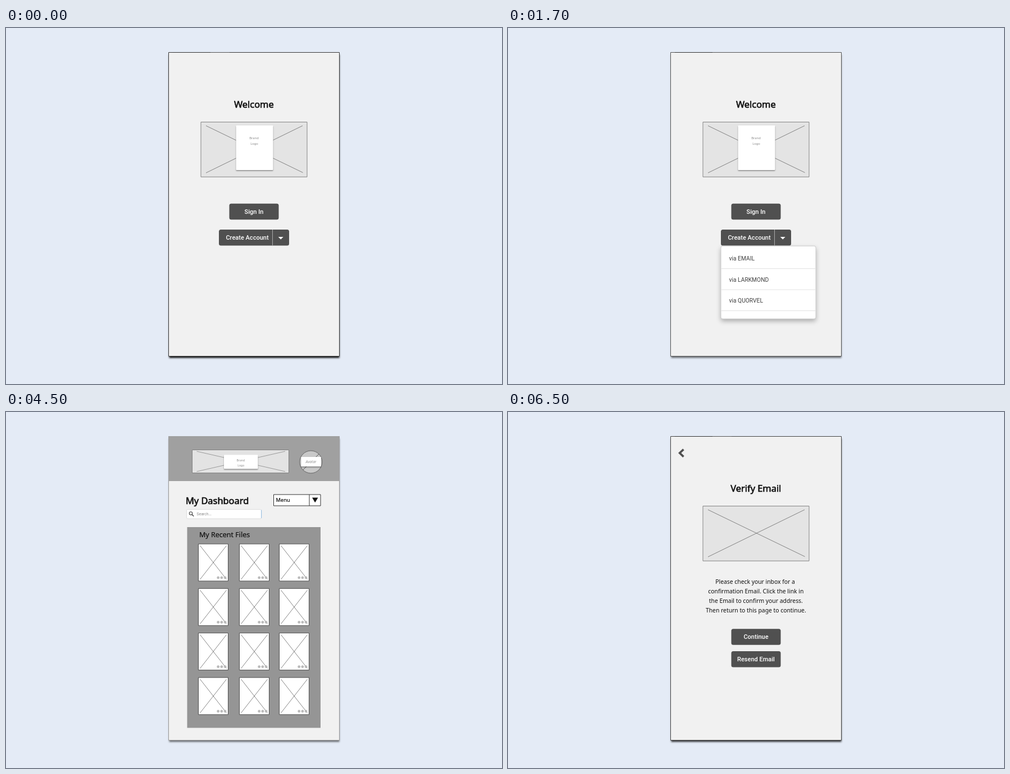
Recreate the animation shown at these times as an HTML page with a canvas. Size 883 by 634 pixels, loop 8 s.

```html
<!DOCTYPE html>
<html lang="en">
<head>
<meta charset="utf-8">
<title>App wireframe walkthrough</title>
<style>
html, body { margin: 0; width: 100%; height: 100%; overflow: hidden; background: #e4ebf6; }
canvas { display: block; width: 883px; height: 634px; }
</style>
</head>
<body>
<canvas id="stage"></canvas>
<script>
const W = 883, H = 634, LOOP = 8000;
const canvas = document.getElementById('stage');
const ctx = canvas.getContext('2d');
const dpr = window.devicePixelRatio || 1;
canvas.width = W * dpr;
canvas.height = H * dpr;

const NOTO = '"Noto Sans", sans-serif';
const ROBOTO = 'Roboto, sans-serif';
const DARK = '#505050';

function box(x, y, w, h, { r = 0, fill, stroke, shadow, line = 1 } = {}) {
  ctx.save();
  ctx.beginPath();
  ctx.roundRect(x, y, w, h, r);
  if (fill) {
    if (shadow) {
      ctx.shadowColor = `rgba(0,0,0,${shadow[2]})`;
      ctx.shadowOffsetY = shadow[0] * dpr;
      ctx.shadowBlur = shadow[1] * dpr;
    }
    ctx.fillStyle = fill;
    ctx.fill();
    ctx.shadowColor = 'transparent';
  }
  if (stroke) {
    ctx.strokeStyle = stroke;
    ctx.lineWidth = line;
    ctx.stroke();
  }
  ctx.restore();
}

function path(points, color, width = 1) {
  ctx.beginPath();
  for (let i = 0; i < points.length; i += 2) ctx.lineTo(points[i], points[i + 1]);
  ctx.strokeStyle = color;
  ctx.lineWidth = width;
  ctx.stroke();
}

function polygon(points, color) {
  ctx.beginPath();
  for (let i = 0; i < points.length; i += 2) ctx.lineTo(points[i], points[i + 1]);
  ctx.fillStyle = color;
  ctx.fill();
}

function circle(x, y, r, fill, stroke, width = 1) {
  ctx.beginPath();
  ctx.arc(x, y, r, 0, Math.PI * 2);
  if (fill) { ctx.fillStyle = fill; ctx.fill(); }
  if (stroke) { ctx.strokeStyle = stroke; ctx.lineWidth = width; ctx.stroke(); }
}

function text(str, x, y, font, color, align = 'left', embolden = 0) {
  ctx.font = font;
  ctx.textAlign = align;
  ctx.fillStyle = color;
  ctx.fillText(str, x, y);
  if (embolden) {
    ctx.lineJoin = 'round';
    ctx.strokeStyle = color;
    ctx.lineWidth = embolden;
    ctx.strokeText(str, x, y);
    ctx.lineJoin = 'miter';
  }
}

const heading = (str, x, y, align = 'center') =>
  text(str, x, y, `16.4px ${NOTO}`, '#111', align, 0.65);
const label = (str, x, y, color = '#111') =>
  text(str, x, y, `10.25px ${ROBOTO}`, color);

function button(str, x, y, w, h = 28.5, textX = x + w / 2) {
  box(x, y, w, h, { r: 3.5, fill: DARK });
  text(str, textX, y + 18.2, `500 11px ${ROBOTO}`, '#fff', 'center');
}

function phone(border, shade) {
  ctx.fillStyle = '#e4ebf6';
  ctx.fillRect(0, 0, W, H);
  box(289.5, 43.5, 304, 541, { fill: '#f1f1f1', stroke: border, shadow: [3, 3, shade] });
  path([297, 43.5, 364, 43.5], '#333');
  path([364, 43.5, 398, 43.5], '#555');
}

function back(x) {
  path([x + 9.3, 66.6, x + 2.5, 73, x + 9.3, 79.6], DARK, 3.7);
}

function pictureBox() {
  box(347, 167.5, 189, 97.7, { fill: '#e4e4e4', stroke: '#858585' });
  path([356, 174, 528.5, 257.5], '#777', 0.9);
  path([356, 258, 528, 174], '#777', 0.9);
}

function card(x, y, w, h) {
  box(x, y, w, h, { r: 1, fill: '#fff', shadow: [1.5, 2, 0.4] });
}

function brandCard(cx, y1, y2, size) {
  text('Brand', cx, y1, `${size}px ${NOTO}`, '#8a8a8a', 'center');
  text('Logo', cx + 0.5, y2, `${size}px ${NOTO}`, '#8a8a8a', 'center');
}

function welcome(border, shade) {
  phone(border, shade);
  heading('Welcome', 441.3, 142);
  pictureBox();
  card(409.5, 173.5, 66, 79.5);
  brandCard(441.5, 198, 208.3, 5.8);
  button('Sign In', 397.5, 312.7, 88);
  button('Create Account', 379, 359, 125, 28.5, 429.5);
  path([474.5, 359, 474.5, 387.5], '#aaa');
  polygon([484.7, 372, 493.7, 372, 489.2, 376.6], '#fff');
}

function signupMenu() {
  welcome('#555', 0.55);
  box(379, 388.2, 169, 129.8, { r: 3, fill: '#fff', stroke: '#ccc', shadow: [4, 9, 0.3] });
  ['EMAIL', 'LARKMOND', 'QUORVEL'].forEach((name, i) => {
    const y = 428.5 + i * 37.5;
    label('via ' + name, 393.5, y - 14.3, '#404040');
    path([379.5, y, 547.5, y], '#e2e2e2');
  });
}

function radio(str, x, on) {
  box(x, 477.5, 128.5, 26, { r: 3, fill: '#fff', stroke: '#d4d4d4' });
  path([x + 25.5, 477.5, x + 25.5, 503.5], '#d4d4d4');
  circle(x + 13, 490.6, 6.5, '#fff', '#cfcfcf');
  if (on) circle(x + 13, 490.6, 4, '#111');
  label(str, x + 33.5, 494.4, '#999');
}

function createAccount() {
  phone('#555', 0.55);
  back(313);
  heading('Create New Account', 441.5, 79);
  ctx.fillStyle = '#d9d9d9';
  ctx.fillRect(290, 140, 303, 318);

  const pitch = 39.75;
  const names = ['Name', 'Email', 'Username', 'Password', '', 'DOB', 'Location', 'Social'];
  names.forEach((name, i) => {
    const y = 147 + i * pitch;
    path([294, y + 33, 593, y + 33], '#a6a6a6');
    label(name, 300, y + (i < 5 ? 21 : 17));
    if (i < 7) box(357.7, y + 0.3, 210.3, 25, { r: 3.5, fill: '#fff', stroke: '#d2d2d2', line: 0.8 });
    if (i === 5 || i === 6) path([551.5, y + 6.5, 557, y + 11.8, 551.5, y + 17], '#111', 1.7);
  });
  label('Confirm', 300, 318);
  label('Password', 300, 328.2);

  ['Larkmond', 'Plovenest', 'Quorvel', 'Brindo'].forEach((name, i) => {
    const x = 337.2 + i * 58.8;
    box(x, 431, 52, 19, { r: 2, fill: DARK });
    path([x + 5.3, 440.5, x + 13.3, 440.5], '#fff', 1.3);
    path([x + 9.3, 436.5, x + 9.3, 444.5], '#fff', 1.3);
    text(name, x + 15.6, 443, `500 7.2px ${ROBOTO}`, '#fff');
  });

  radio('Basic Accont', 305, true);
  radio('Premium Account', 449.7, false);
  text('Terms of Use', 441.3, 523, `500 11px ${ROBOTO}`, '#4a9fee', 'center');
  button('Agree and Create Account', 356.2, 536.3, 179.3);
}

function tile(x, y) {
  box(x, y, 53, 66, { fill: '#fff', stroke: '#505050' });
  path([x + 3, y + 3, x + 50, y + 63], '#666', 0.8);
  path([x + 50, y + 3, x + 3, y + 63], '#666', 0.8);
  for (let i = 0; i < 3; i++) circle(x + 35.2 + i * 6.2, y + 60, 2.1, '#bbb', '#aaa', 0.5);
}

function dashboard() {
  phone('#999', 0.55);
  ctx.fillStyle = '#a0a0a0';
  ctx.fillRect(289, 43, 305, 80);

  box(331.5, 67.5, 172, 41, { fill: '#e3e3e3', stroke: '#808080' });
  path([339.5, 70, 497, 106], '#888', 0.8);
  path([339.5, 106, 497, 70], '#888', 0.8);
  card(388, 76.3, 60.5, 25);
  brandCard(417.8, 87.6, 96.6, 5.1);

  circle(542.8, 89, 20, '#c8c8c8', '#666');
  path([528.6, 103.2, 557, 74.8], '#555');
  card(525.3, 80, 35.7, 17);
  text('Avatar', 543, 90.5, `italic 6.5px ${NOTO}`, '#909090', 'center');

  heading('My Dashboard', 319.9, 163.5, 'left');
  box(476.5, 147, 83.5, 20, { fill: '#fff', stroke: '#333' });
  path([540, 147, 540, 167], '#333');
  polygon([545, 152.5, 555.5, 152.5, 550.2, 161.2], '#111');
  text('Menu', 480.5, 160.2, `9.3px ${NOTO}`, '#111', 'left', 0.2);

  box(321.5, 173.5, 133, 16.5, { r: 2, fill: '#fff', stroke: '#ddd' });
  path([454.7, 174.5, 454.7, 189], '#8fbde4');
  circle(329, 180.5, 2.7, null, '#444', 1.1);
  path([331, 182.5, 334.2, 185.7], '#444', 1.4);
  text('Search...', 339.2, 184.2, '6.7px "Liberation Sans", sans-serif', '#888');

  ctx.fillStyle = '#959595';
  ctx.fillRect(322.5, 205, 237.5, 357.5);
  text('My Recent Files', 344, 223, `12.5px ${NOTO}`, '#111', 'left', 0.2);
  for (let row = 0; row < 4; row++) {
    for (const x of [342.5, 415.5, 486.5]) tile(x, 235 + row * 79.3);
  }
}

function verifyEmail() {
  phone('#444', 0.78);
  back(303.2);
  heading('Verify Email', 441.3, 142);
  pictureBox();
  [
    'Please check your inbox for a',
    'confirmation Email. Click the link in',
    'the Email to confirm your address.',
    'Then return to this page to continue.'
  ].forEach((str, i) =>
    text(str, i ? 441.3 : 440, 306 + i * 17, `10.35px ${NOTO}`, '#111', 'center'));
  button('Continue', 397.5, 386.2, 88);
  button('Resend Email', 397.5, 426, 88);
}

const scenes = [
  [500, () => welcome('#383838', 0.95)],
  [2500, signupMenu],
  [4500, createAccount],
  [6500, dashboard],
  [LOOP, verifyEmail]
];

const start = performance.now();
function frame() {
  const t = (performance.now() - start) % LOOP;
  ctx.setTransform(dpr, 0, 0, dpr, 0, 0);
  scenes.find(([end]) => t < end)[1]();
  requestAnimationFrame(frame);
}
frame();
</script>
</body>
</html>
```
